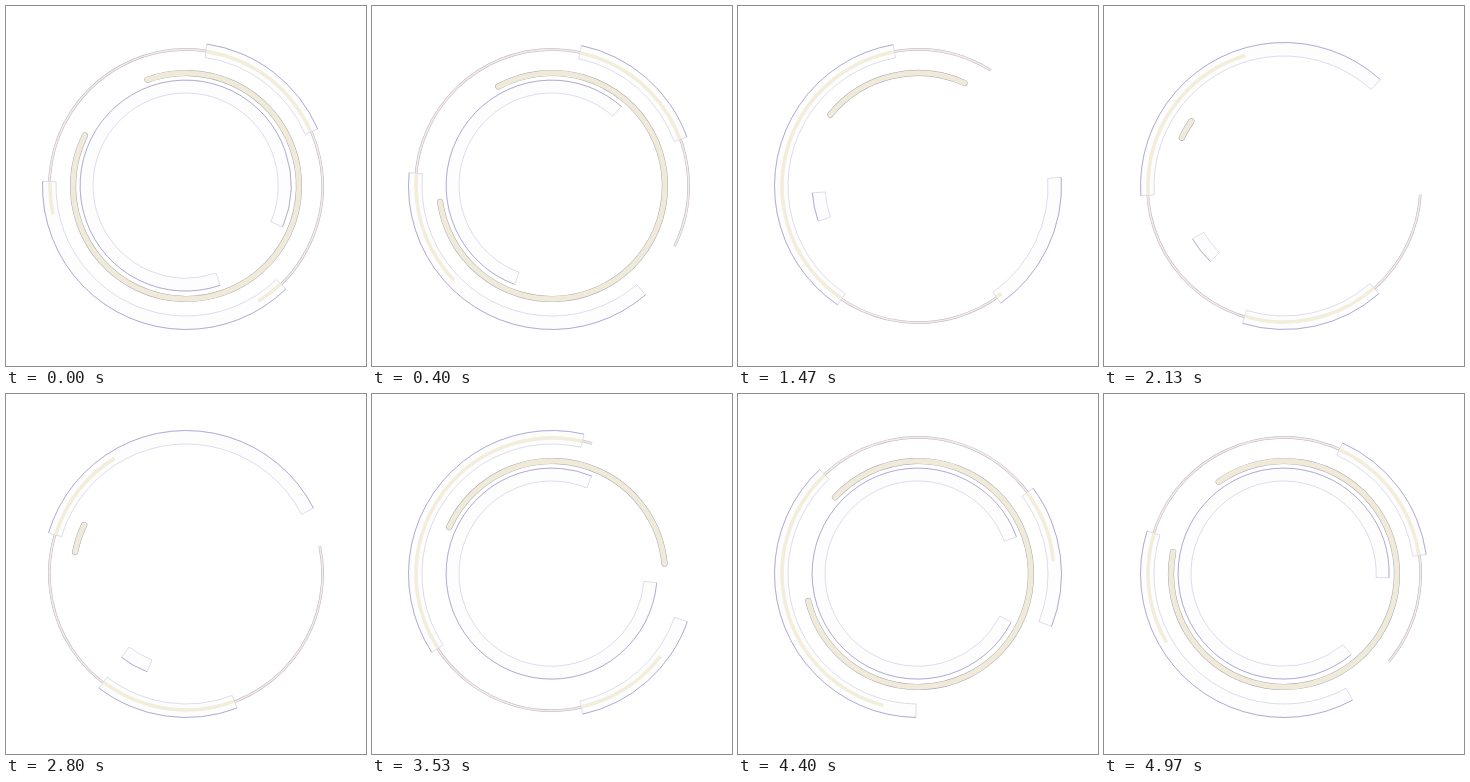
Animation, 360 px wide and 360 px high, one loop 5 s. Source, as an HTML page with a canvas:

```html
<!DOCTYPE html>
<html lang="en">
<head>
<meta charset="utf-8">
<title>Rotating rings</title>
<style>
  html, body { margin: 0; width: 100%; height: 100%; overflow: hidden; background: #fff; }
  canvas { display: block; width: 360px; height: 360px; }
</style>
</head>
<body>
<canvas id="stage" width="360" height="360"></canvas>
<script>
const ctx = document.getElementById('stage').getContext('2d');
const LOOP = 5000;
const CENTER = 180;
const TURN = 2.745; // seconds until the rings reverse

// Same curve as the CSS cubic-bezier() timing function.
function bezier(x1, y1, x2, y2) {
  const at = (a, b, s) => 3 * a * s * (1 - s) ** 2 + 3 * b * s * s * (1 - s) + s ** 3;
  return p => {
    let low = 0, high = 1;
    for (let i = 0; i < 24; i++) {
      const mid = (low + high) / 2;
      if (at(x1, x2, mid) < p) low = mid; else high = mid;
    }
    return at(y1, y2, low);
  };
}

const easeLength = bezier(.35, 0, .53, 1);
const easeForward = bezier(.5, 0, .4, .6);
const easeBack = bezier(.45, .52, .7, .85);

function progress(t, from, to, ease) {
  return ease(Math.min(1, Math.max(0, (t - from) / (to - from))));
}

// Shrinks from max to min after the start, grows back after the turn.
function arcLength(t, min, max, shrinkEnd, growStart, growEnd) {
  const shrunk = progress(t, 0, shrinkEnd, easeLength) - progress(t, growStart, growEnd, easeLength);
  return max - (max - min) * shrunk;
}

// All angles are clockwise degrees from three o'clock.
const bandAngle = t => 278.4 + 157.6 * (progress(t, 0, 2.7, easeForward) - progress(t, 2.7, 5.4, easeBack));
const lineAngle = t => Math.hypot(80 * (t - 2.6), 25) - 41.5;
const creamStart = t => 188.7 + 21 * Math.abs(t - 2.85);
const creamLength = t => arcLength(t, 10, 319.5, 2.3, 2.6, 4.75);
const innerCenter = t => 117.3 + 40 * Math.abs(t - TURN);
const innerLength = t => arcLength(t, 15.6, 312, 1.05, 2.78, 3.75);

const rad = deg => deg * Math.PI / 180;

function strokeArc(radius, from, to, width, color, cap = 'butt', center = CENTER) {
  ctx.beginPath();
  ctx.arc(center, center, radius, rad(from), rad(to));
  ctx.lineWidth = width;
  ctx.strokeStyle = color;
  ctx.lineCap = cap;
  ctx.stroke();
}

function drawBand(inner, outer, from, to, center = CENTER) {
  const path = new Path2D();
  path.arc(center, center, outer, rad(from), rad(to));
  path.arc(center, center, inner, rad(to), rad(from), true);
  path.closePath();
  ctx.fillStyle = '#fdfdfd';
  ctx.fill(path);
  ctx.lineWidth = .6;
  ctx.strokeStyle = 'rgba(120, 110, 180, .4)';
  ctx.stroke(path);
  strokeArc(outer, from, to, .6, 'rgba(85, 75, 160, .55)', 'butt', center);
  return path;
}

function drawOuter(t) {
  const line = lineAngle(t), lineEnd = line + 250;
  strokeArc(136.6, line, lineEnd, 2.6, '#bdb2bf');
  strokeArc(136.6, line, lineEnd, 1.6, '#f2ebea');

  const band = bandAngle(t);
  for (const [from, to] of [[band, band + 58.2], [band + 127.5, band + 263.5]]) {
    const path = drawBand(130, 143.5, from, to);
    ctx.save();
    ctx.clip(path);
    strokeArc(136, line, lineEnd, 3.6, '#f2eedb');
    ctx.restore();
  }
}

function drawCream(t) {
  const cap = 1.5;
  const from = creamStart(t) + cap;
  const to = from + creamLength(t) - 2 * cap;
  strokeArc(113, from, to, 6.2, '#a9a0b4', 'round');
  strokeArc(113, from, to, 5.3, '#f0ead9', 'round');
}

function drawInner(t) {
  const middle = innerCenter(t), half = innerLength(t) / 2;
  drawBand(92.6, 105.5, middle - half, middle + half, 179.6);
}

const begin = performance.now();

function frame() {
  const t = (performance.now() - begin) % LOOP / 1000;
  ctx.fillStyle = '#fff';
  ctx.fillRect(0, 0, 360, 360);
  drawOuter(t);
  drawCream(t);
  drawInner(t);
  requestAnimationFrame(frame);
}
frame();
</script>
</body>
</html>
```
